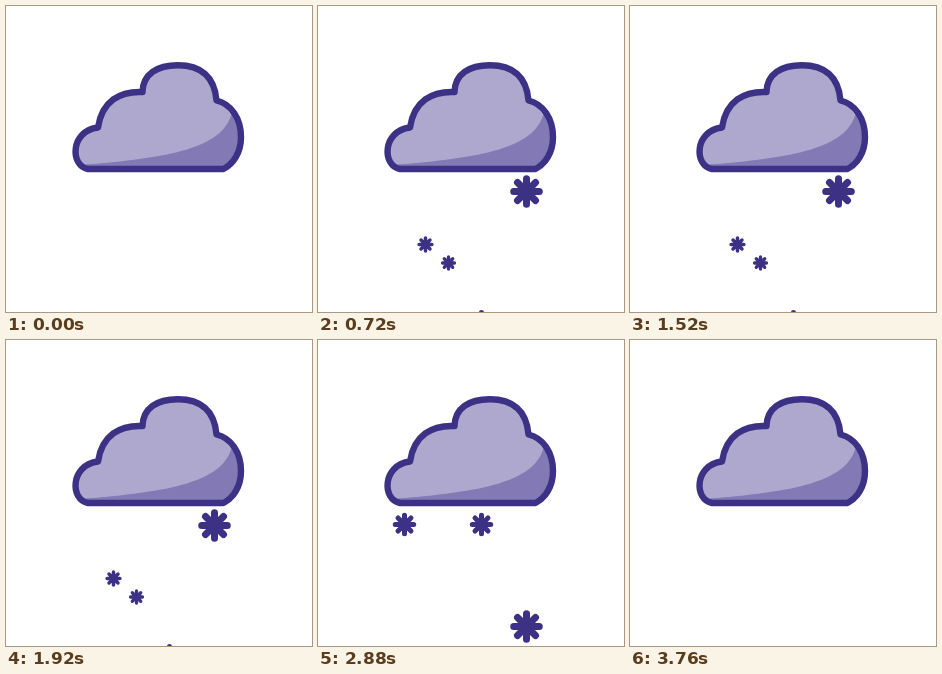
These frames come from a looping animation (306x306 px, 4 s). An HTML page:

```html
<!DOCTYPE html>
<html lang="en">
<head>
<meta charset="utf-8">
<title>Snow cloud</title>
<style>
  html, body { margin: 0; width: 100%; height: 100%; overflow: hidden; background: #fff; }
  svg { display: block; width: 100vw; height: 100vh; }
</style>
</head>
<body>
<svg viewBox="0 0 306 306">
  <defs>
    <path id="cloud" d="M82 163C64 160 64 125 92 121.5C96 95 114 85 136.5 86C137 68 151 59.3 172 59.3C194 59.3 208.5 70 210.5 94.5C225 98 235 112 235 131C235 147 227 158 217.5 163Z"/>
    <clipPath id="inside"><use href="#cloud"/></clipPath>
    <path id="flake" d="M0-12.8V12.8M-12.8 0H12.8M-9-9L9 9M-9 9L9-9"
      fill="none" stroke="#3d3186" stroke-width="7" stroke-linecap="round"/>
  </defs>
  <g id="snow"></g>
  <use href="#cloud" fill="#afa8ce"/>
  <path clip-path="url(#inside)" fill="#8379b5" d="M226 106C218 142 165 152 74 159V170H245V106Z"/>
  <use href="#cloud" fill="none" stroke="#3d3186" stroke-width="6.4" stroke-linejoin="round"/>
</svg>
<script>
  const LOOP = 4000, STEP = 80, LAST_STEP = 47, PERIOD = 5, FALLS = 9;

  // y is the height at the first step below the cloud, speed is px per step
  const flakes = [
    { x: 86.5, y: 184.5, first: 1, speed: 50.5, radius: 11.5 },
    { x: 163.5, y: 184.5, first: 1, speed: 43.7, radius: 11.5 },
    { x: 107.5, y: 188, first: 3, speed: 50.5, radius: 8 },
    { x: 130.5, y: 206.5, first: 3, speed: 50.5, radius: 7.5 },
    { x: 208.5, y: 185.5, first: 4, speed: 50.5, radius: 16 }
  ];

  const snow = document.getElementById('snow');
  for (const flake of flakes) {
    flake.node = document.createElementNS(snow.namespaceURI, 'use');
    flake.node.setAttribute('href', '#flake');
    snow.append(flake.node);
  }

  function draw(now) {
    const step = Math.min(LAST_STEP, Math.floor(now % LOOP / STEP));
    for (const { x, y, first, speed, radius, node } of flakes) {
      const age = step - first;
      const falling = age >= 0 && age < FALLS * PERIOD && step < LAST_STEP;
      const top = y + speed * (age % PERIOD);
      node.setAttribute('visibility', falling ? 'visible' : 'hidden');
      node.setAttribute('transform', `translate(${x} ${top}) scale(${radius / 16})`);
    }
  }

  const start = performance.now();
  function tick() {
    draw(performance.now() - start);
    requestAnimationFrame(tick);
  }
  tick();
</script>
</body>
</html>
```
